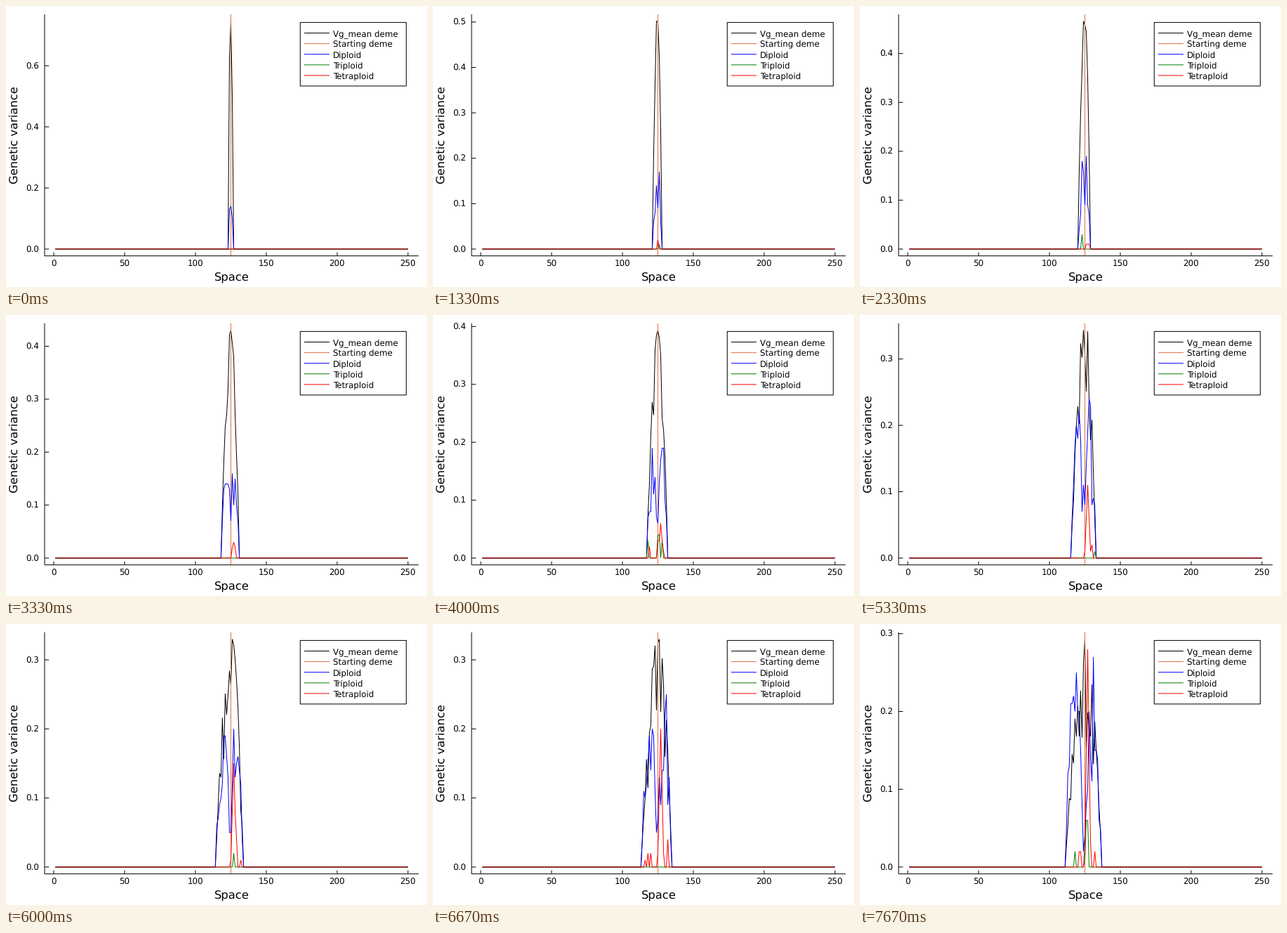
Write a matplotlib script that moves like this. It is 600x400 px and loops after 8000 ms.

```python
import numpy as np
import matplotlib.pyplot as plt
from matplotlib.animation import FuncAnimation

PX = 0.72                      # points per pixel at 100 dpi
LOOP, TICK, STEPS = 8000, 50, 24
RIGHT, TOP, BOTTOM = 588, 11.8, 355.7
SMALL, LARGE = 11.85 * PX, 16.35 * PX
DEMES = np.arange(1, 251)
ORANGE = "#e26f46"

plt.rcParams["font.family"] = "DejaVu Sans"
plt.rcParams["text.hinting"] = "none"

# Key points of the largest variance, which sets the vertical scale.
PEAK_STEPS = [0, 4, 10, 14, 18, 20, 21, 22, 23]
PEAK_VALUES = [.746, .502, .4305, .357, .33, .33, .293, .27, .293]


def peak_at(step):
    return np.interp(step, PEAK_STEPS, PEAK_VALUES)


def spikes(rng, inside, chance, tallest):
    """Rare isolated peaks in whole hundredths."""
    heights = rng.integers(1, tallest + 1, DEMES.size) / 100
    return heights * inside * (rng.random(DEMES.size) < chance)


def curves(step):
    """Variance in a population that spreads from the middle."""
    rng = np.random.default_rng(step)
    age = step / (STEPS - 1)
    middle = 124.5
    first = round(123 - 12 * age ** 1.05)
    last = round(127 + 10 * age ** 1.2)
    side = DEMES - middle
    reach = np.where(side < 0, side / (first - middle), side / (last - middle))
    reach = np.minimum(reach, 1)
    inside = reach < 1
    bump = 1 - reach ** np.where(side < 0, 1.5, 2)

    mean = bump * (1 - .5 * age * rng.random(DEMES.size) ** 2)
    mean *= peak_at(step) / mean.max()

    # Diploids start in the middle and later hold both flanks.
    flanks = np.sin(np.pi * reach)
    diploid = (1 - age) * bump + age * flanks
    diploid *= (.18 + .1 * age) * rng.uniform(.4, 1.05, DEMES.size)
    diploid = np.round(diploid, 2) * inside

    triploid = spikes(rng, inside, .12, 2 + int(5 * age))
    core = .28 * age ** 2.5 * np.exp(-((DEMES - 127) / 1.3) ** 2)
    tetraploid = spikes(rng, inside, .15 * age, 2 + int(3 * age))
    tetraploid = np.maximum(tetraploid, np.round(core, 2))
    return mean, diploid, triploid, tetraploid


def y_ticks(peak):
    gap = .2 if peak > .55 else .05 if peak < .28 else .1
    return np.arange(0, peak * 1.03, gap), 2 if gap == .05 else 1


fig = plt.figure(figsize=(6, 4), dpi=100, facecolor="white")
ax = fig.add_axes([0, 0, 1, 1])
ax.set(xlim=(0, 600), ylim=(400, 0))
ax.axis("off")


def stroke(x, y, color, z):
    line, = ax.plot(x, y, color=color, lw=PX, zorder=z, snap=False,
                    solid_capstyle="butt", solid_joinstyle="miter")
    return line


def label(x, y, text="", size=SMALL, ha="center", **kw):
    return ax.text(x, y, text, size=size, ha=ha, va="baseline", zorder=8, **kw)


series = [stroke([], [], color, z) for color, z in
          zip(["black", "blue", "green", "red"], (1, 3, 4, 5))]
start_line = stroke([], [], ORANGE, 2)
frame_line = stroke([], [], "black", 6)
tick_line = stroke([], [], "black", 6)
x_labels = [label(0, 371, str(v)) for v in range(0, 251, 50)]
y_labels = [label(0, 0, ha="right") for _ in range(8)]
x_title = label(0, 392, "Space", LARGE)
label(16.6, 184, "Genetic variance", LARGE, rotation=90, rotation_mode="anchor")

ax.add_patch(plt.Rectangle((419.3, 23.4), 151.1, 90.5, facecolor="white",
                           edgecolor="black", lw=PX, zorder=7, snap=False))
entries = [("Vg_mean deme", "black"), ("Starting deme", ORANGE),
           ("Diploid", "blue"), ("Triploid", "green"), ("Tetraploid", "red")]
for row, (name, color) in enumerate(entries):
    y = 38.5 + 15.1 * row
    stroke([425, 461], [y, y], color, 8)
    label(466.3, y + 4.4, name, ha="left")


def draw(frame):
    step = 3 * (frame * TICK + 40) // 1000 % STEPS
    peak = peak_at(step)
    ticks, digits = y_ticks(peak)
    left = 55 + 7.5 * (digits - 1)     # longer labels push the axis right
    x_scale = (RIGHT - left) / (249 * 1.06)
    y_scale = (BOTTOM - TOP) / (peak * 1.06)

    def to_x(v):
        return left + (v - 1 + 249 * .03) * x_scale

    def to_y(v):
        return BOTTOM - (v + peak * .03) * y_scale

    for line, values in zip(series, curves(step)):
        line.set_data(to_x(DEMES), to_y(values))
    start_line.set_data([to_x(125)] * 2, [TOP, BOTTOM])
    frame_line.set_data([left, left, RIGHT], [TOP, BOTTOM, BOTTOM])

    tx, ty = [], []
    for text, v in zip(x_labels, range(0, 251, 50)):
        x = to_x(v)
        text.set_x(x)
        tx += [x, x, np.nan]
        ty += [BOTTOM, BOTTOM - 5, np.nan]
    for i, text in enumerate(y_labels):
        text.set_visible(i < len(ticks))
        if i < len(ticks):
            y = to_y(ticks[i])
            text.set_text(f"{ticks[i]:.{digits}f}")
            text.set_position((left - 8, y + 4.4))
            tx += [left, left + 6.3, np.nan]
            ty += [y, y, np.nan]
    tick_line.set_data(tx, ty)
    x_title.set_x((left + RIGHT) / 2)
    return []


anim = FuncAnimation(fig, draw, frames=LOOP // TICK, interval=TICK,
                     repeat=True, repeat_delay=0, cache_frame_data=False)
plt.show()
```
